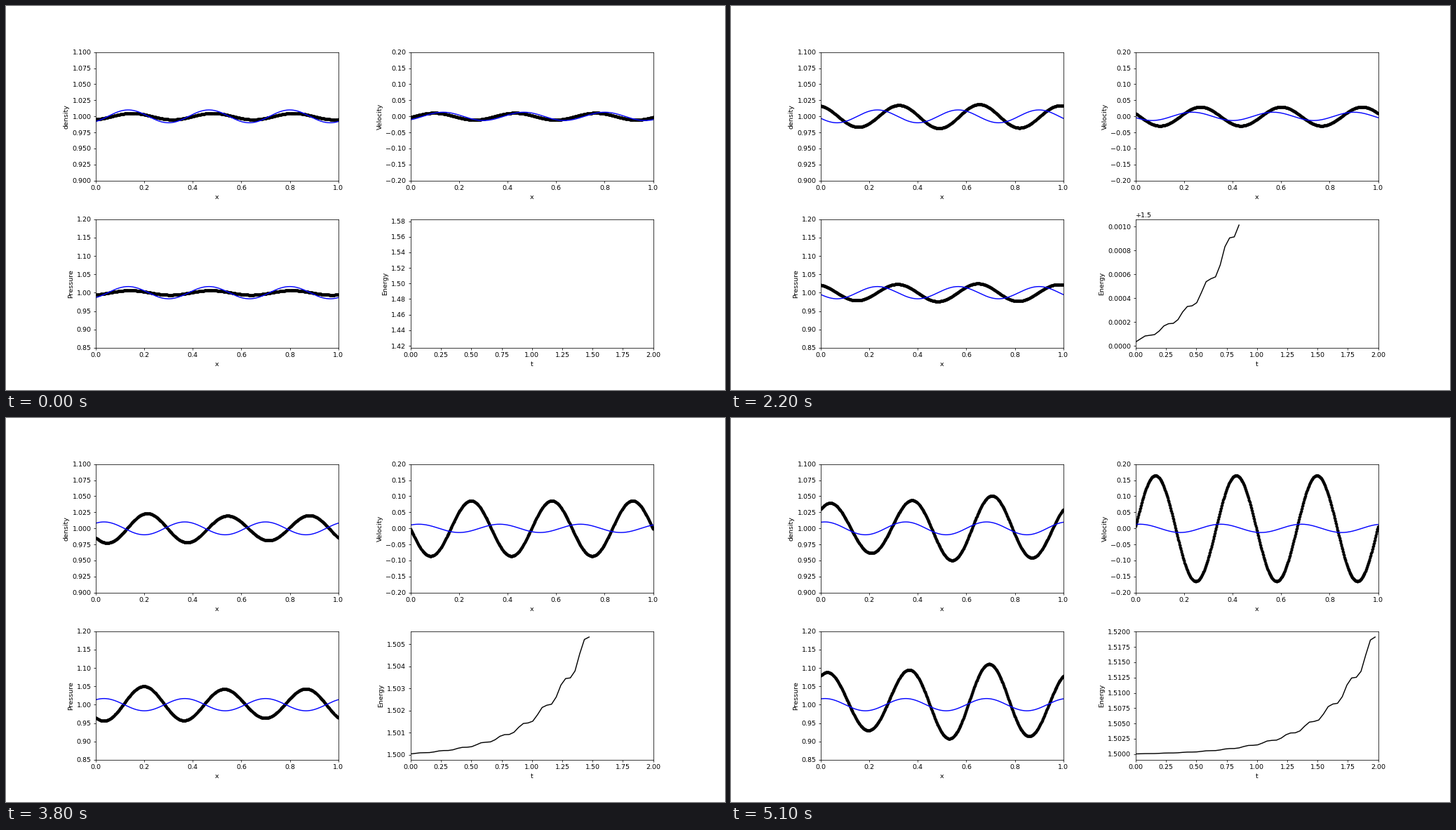
Animation of 1025 by 547 pixels, one loop 5.2 s. Source, as a matplotlib script:

```python
import matplotlib.pyplot as plt
import numpy as np
from matplotlib.animation import FuncAnimation

FRAMES, INTERVAL = 52, 100
DPI = 1025 / 15
SOUND = np.sqrt(5 / 3)
STEP = 0.05 / SOUND           # simulated time per frame
K = 6 * np.pi                 # three wavelengths fit into the domain
OMEGA = np.radians(41.3)      # phase advance of the simulated wave per frame
GROWTH = 0.051                # exponential growth per frame
PHASE_A, PHASE_B = np.radians(126), np.radians(45)
AMP_A, AMP_B = 0.0128, 0.0037

x = np.linspace(0, 1, 1000)
frames = np.arange(FRAMES)


def velocity(frame):
    """Two growing standing waves, a quarter wavelength apart."""
    turn = OMEGA * frame
    return np.exp(GROWTH * frame) * (
        AMP_A * np.sin(PHASE_A + turn) * np.sin(K * x)
        - AMP_B * np.sin(PHASE_B + turn) * np.cos(K * x))


def compression(frame, scale, lag=0):
    """The matching density or pressure wave under a drifting envelope."""
    turn = OMEGA * frame - lag
    standing = np.exp(GROWTH * frame) * (
        AMP_A * np.cos(PHASE_A + turn) * np.cos(K * x)
        + AMP_B * np.cos(PHASE_B + turn) * np.sin(K * x))
    centre = 0.036 * (frame - 33)
    depth = 0.15 * frame / FRAMES
    return scale * standing * (1 + depth * np.cos(2 * np.pi * (x - centre)))


def energy_gain(frame):
    """Exponential growth that stalls twice in every wave period."""
    phase = PHASE_A + np.radians(20) + OMEGA * frame
    stepped = frame + np.sin(2 * phase) / (2 * OMEGA)
    return 1.40e-4 * np.exp(0.0966 * stepped) - 0.99e-4


def wave_panel(ax, label, low, high):
    ax.set(xlim=(0, 1), ylim=(low, high), xlabel="x", ylabel=label)
    dots, = ax.plot([], [], "k.", markersize=6)
    line, = ax.plot([], [], "b-", linewidth=1.5)
    return dots, line


fig, axes = plt.subplots(2, 2, figsize=(1025.001 / DPI, 547.001 / DPI), dpi=DPI)
fig.subplots_adjust(left=0.125, right=0.9, bottom=0.11, top=0.88,
                    wspace=0.299, hspace=0.3)
(ax_rho, ax_u), (ax_p, ax_e) = axes

# Lines, mean value and amplitude of the analytic wave
panels = [
    (wave_panel(ax_rho, "density", 0.9, 1.1), 1, 0.01),
    (wave_panel(ax_u, "Velocity", -0.2, 0.2), 0, 0.01 * SOUND),
    (wave_panel(ax_p, "Pressure", 0.85, 1.2), 1, 0.01 * SOUND ** 2),
]
ax_e.set(xlim=(0, 2), xlabel="t", ylabel="Energy")
energy_line, = ax_e.plot([], [], "k-", linewidth=1.5)


def draw(frame):
    rho = compression(frame, 0.62)
    p = compression(frame, 0.97, np.radians(10)) + 0.4 * energy_gain(frame)
    analytic = np.sin(K * (x - 0.05 * (frame + 1)))
    artists = [energy_line]
    for ((dots, line), mean, amp), values in zip(panels, (rho, velocity(frame), p)):
        dots.set_data(x, mean + values)
        line.set_data(x, mean + amp * analytic)
        artists += [dots, line]

    past = frames[:frame + 1]
    energy_line.set_data(past * STEP, 1.5 + energy_gain(past))
    ax_e.relim()
    ax_e.autoscale_view(scalex=False)
    return artists


anim = FuncAnimation(fig, draw, frames=FRAMES, interval=INTERVAL,
                     repeat=True, repeat_delay=0, blit=False)
plt.show()
```
